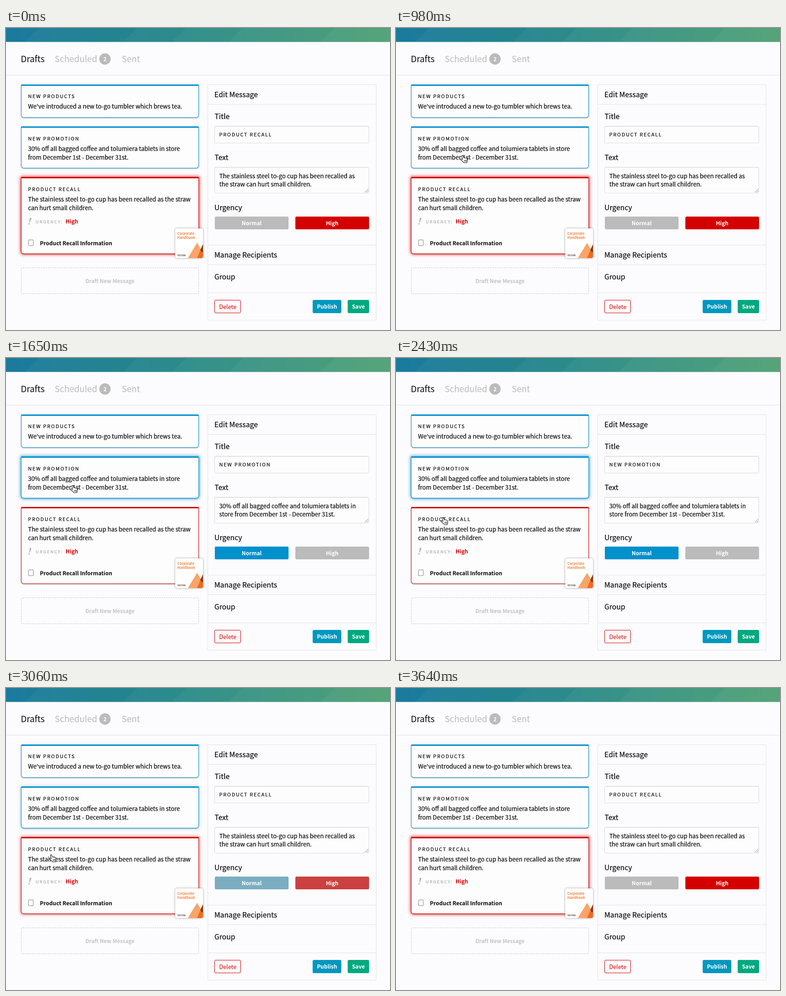
Recreate the animation shown at these times as an HTML page. Size 844x663 px, loop 5.23 s.

```html
<!DOCTYPE html>
<html lang="en">
<head>
<meta charset="utf-8">
<title>Message drafts</title>
<style>
  :root { --blue: #0090cc; --red: #d40000; --grey: #bbb; --line: #e3e3e6; --loop: 5230ms; }
  html, body { margin: 0; width: 100%; height: 100%; overflow: hidden; background: #fcfbfd; }
  .stage { position: relative; width: 844px; height: 663px; overflow: hidden; }
  .stage div { position: absolute; box-sizing: border-box; }
  svg { position: absolute; left: 0; top: 0; }

  .card {
    left: 33px; width: 391px;
    border: 1px solid var(--tone); border-top-width: 3px; border-radius: 2px 2px 6px 6px;
    background: #fdfdfe; box-shadow: 0 1px 3px rgba(0, 0, 0, .28);
  }
  .card.blue { --tone: var(--blue); --halo: rgba(0, 144, 204, .6); }
  .card.red { --tone: var(--red); --halo: rgba(212, 0, 0, .6); }
  .glow { inset: -3px -1px -1px; border-radius: inherit; box-shadow: 0 0 6px 2px var(--halo); }

  .draft { left: 33px; top: 526px; width: 391px; height: 58px; border: 1px dashed #c6c6ca; border-radius: 4px; }
  .thumb { left: 372px; top: 440px; width: 61px; height: 65px; border-radius: 4px; background: #fff; box-shadow: 0 0 4px rgba(0, 0, 0, .38); }

  .panel { left: 443px; top: 124px; width: 371px; height: 518px; border: 1px solid var(--line); border-radius: 2px; }
  .rule { left: 443px; width: 371px; height: 1px; background: var(--line); }
  .field { left: 458px; width: 340px; border: 1px solid #dcdcdf; border-radius: 3px; background: #fdfdfe; box-shadow: inset 0 1px 1px rgba(0, 0, 0, .09); }
  .btn { border-radius: 3px; overflow: hidden; }
  .choice { top: 414px; width: 162px; height: 28px; background: var(--grey); }
  .fill { inset: 0; }
  .act { top: 597px; height: 29px; }

  text { font-family: "Noto Sans CJK JP", "Noto Sans CJK SC", "Noto Sans CJK", "Noto Sans", sans-serif; fill: #0a0a0c; white-space: pre; }
  .tab { font-size: 18.9px; font-weight: 300; }
  .cap { font-size: 10.9px; letter-spacing: 1.75px; }
  .body { font-size: 13.12px; }
  .head { font-size: 15.8px; }
  .cap, .body, .head { stroke: #0a0a0c; stroke-width: .22px; }
  .bold { font-size: 11.95px; font-weight: 700; }
  .mid { text-anchor: middle; }
  .mute { fill: var(--grey); }
  .white { fill: #fff; }
  .warn { fill: var(--red); }

  .on, .off, .after, .before, .hand, .hand g { animation: var(--loop) infinite; }
  .on { animation-name: on; animation-timing-function: ease; }
  .off { animation-name: off; animation-timing-function: ease; }
  .after { animation-name: after; animation-timing-function: step-end; }
  .before { animation-name: before; animation-timing-function: step-end; }
  .hand { animation-name: show; animation-timing-function: step-end; }
  .hand g { animation-name: move; animation-timing-function: linear; }

  @keyframes on {
    0%, 28.3% { opacity: 0; }
    31.5%, 57.25% { opacity: 1; }
    60.6%, 100% { opacity: 0; }
  }
  @keyframes off {
    0%, 28.3% { opacity: 1; }
    31.5%, 57.25% { opacity: 0; }
    60.6%, 100% { opacity: 1; }
  }
  @keyframes after {
    0% { opacity: 0; }
    27.725% { opacity: 1; }
    57.361%, 100% { opacity: 0; }
  }
  @keyframes before {
    0% { opacity: 1; }
    27.725% { opacity: 0; }
    57.361%, 100% { opacity: 1; }
  }
  @keyframes show {
    0% { opacity: 0; }
    8.987% { opacity: 1; }
    69.598%, 100% { opacity: 0; }
  }
  @keyframes move {
    0%, 8.987% { transform: translate(5px, 313px); }
    13.6% { transform: translate(104px, 302px); animation-timing-function: ease-out; }
    18.5% { transform: translate(141px, 279px); }
    39.9% { transform: translate(141px, 279px); animation-timing-function: cubic-bezier(.4, 0, .7, .9); }
    46.463% { transform: translate(98px, 349px); animation-timing-function: ease-out; }
    50.6% { transform: translate(94px, 365px); }
    66.5% { transform: translate(94px, 365px); animation-timing-function: ease-in; }
    68.451%, 100% { transform: translate(37px, 402px); }
  }
</style>
</head>
<body>
<div class="stage">
  <div class="card blue" style="top:124px;height:73px"></div>
  <div class="card blue" style="top:216px;height:92px"><div class="glow on"></div></div>
  <div class="card red" style="top:327px;height:169px"><div class="glow off"></div></div>
  <div class="draft"></div>
  <div class="thumb"></div>

  <div class="panel"></div>
  <div class="rule" style="top:167px"></div>
  <div class="rule" style="top:476px"></div>
  <div class="rule" style="top:519px"></div>
  <div class="rule" style="top:581px"></div>
  <div class="field" style="top:215px;height:38px"></div>
  <div class="field" style="top:305px;height:58px"></div>
  <div class="btn choice" style="left:459px"><div class="fill on" style="background:var(--blue)"></div></div>
  <div class="btn choice" style="left:636px"><div class="fill off" style="background:var(--red)"></div></div>
  <div class="btn act" style="left:458px;width:58px;border:1px solid var(--red)"></div>
  <div class="btn act" style="left:674px;width:63px;background:#0098bf"></div>
  <div class="btn act" style="left:751px;width:47px;background:#00a97f"></div>

  <svg width="844" height="663" viewBox="0 0 844 663">
    <defs>
      <linearGradient id="sky" gradientUnits="userSpaceOnUse" x1="0" x2="844" y1="0" y2="0">
        <stop offset="0" stop-color="#1b7b9e"/>
        <stop offset=".47" stop-color="#19817f"/>
        <stop offset="1" stop-color="#2f905c"/>
      </linearGradient>
    </defs>

    <rect width="844" height="30.6" fill="url(#sky)"/>
    <g fill="#fff" fill-opacity=".04">
      <path d="M73 0H844V30.6H42z"/>
      <path d="M288 0H844V30.6H257z"/>
      <path d="M396 0H844V30.6H365z"/>
      <path d="M520 0H844V30.6H489z"/>
      <path d="M723 0H844V30.6H692z"/>
    </g>
    <path d="M0 103.5H844" stroke="#dfdfe2"/>

    <text class="tab" x="32.4" y="75">Drafts</text>
    <text class="tab mute" x="107" y="75">Scheduled</text>
    <circle cx="217.5" cy="68" r="12.5" fill="#bbb"/>
    <text class="bold white mid" x="217.5" y="72.5">2</text>
    <text class="tab mute" x="254.3" y="75">Sent</text>

    <text class="cap" x="48.5" y="154">NEW PRODUCTS</text>
    <text class="body" x="48.5" y="177">We've introduced a new to-go tumbler which brews tea.</text>

    <text class="cap" x="48.5" y="246.5">NEW PROMOTION</text>
    <text class="body" x="48.5" y="270">30% off all bagged coffee and tolumiera tablets in store</text>
    <text class="body" x="48.5" y="288.5">from December 1st - December 31st.</text>

    <text class="cap" x="48.5" y="357.5">PRODUCT RECALL</text>
    <text class="body" x="48.5" y="381">The stainless steel to-go cup has been recalled as the straw</text>
    <text class="body" x="48.5" y="399.5">can hurt small children.</text>
    <path d="M52 417H56.2L52.6 427H51.2z" fill="#b4b4b4"/>
    <circle cx="50.6" cy="430" r="1.6" fill="#b4b4b4"/>
    <text class="mute" x="65" y="429" font-size="9.5" font-weight="700" letter-spacing="1.55">URGENCY:</text>
    <text class="bold warn" x="131" y="429">High</text>
    <rect x="49.5" y="465.2" width="10.5" height="12.6" rx="1.5" fill="none" stroke="#a9a9a9" stroke-width="1.5"/>
    <text class="bold" x="74.6" y="476.5">Product Recall Information</text>

    <g>
      <path d="M400 505L420 472L433 494V501Q433 505 429 505z" fill="#f58a45"/>
      <path d="M420 472L428 486L420 505H400z" fill="#f9a468"/>
      <path d="M420 505L433 475V501Q433 505 429 505z" fill="#f26a1b"/>
      <path d="M427 487L433 475V492L430 492z" fill="#8a3a14"/>
      <text x="376.5" y="454.3" font-size="7.6" font-weight="700" style="fill:#f3853f">Corporate</text>
      <text x="376.5" y="463.3" font-size="7.6" font-weight="700" style="fill:#f3853f">Handbook</text>
      <text x="377" y="500.8" font-size="4.1" font-weight="700" style="fill:#5a3a2c">VELTORA</text>
    </g>

    <text class="bold mid" x="228.5" y="559.5" style="font-size:11.6px;fill:#c3c3c9">Draft New Message</text>

    <text class="head" x="458" y="152">Edit Message</text>
    <text class="head" x="458.4" y="200">Title</text>
    <text class="head" x="458.4" y="290">Text</text>
    <text class="head" x="458" y="400">Urgency</text>
    <text class="head" x="458" y="504">Manage Recipients</text>
    <text class="head" x="458" y="552">Group</text>

    <g class="before">
      <text class="cap" x="468.8" y="238">PRODUCT RECALL</text>
      <text class="body" x="468.8" y="329.5">The stainless steel to-go cup has been recalled as</text>
      <text class="body" x="468.8" y="348">the straw can hurt small children.</text>
    </g>
    <g class="after">
      <text class="cap" x="468.8" y="238">NEW PROMOTION</text>
      <text class="body" x="468.8" y="329.5">30% off all bagged coffee and tolumiera tablets in</text>
      <text class="body" x="468.8" y="348">store from December 1st - December 31st.</text>
    </g>
    <path d="M788.5 361L796.5 353M793 361L796.5 357.5" stroke="#777" fill="none"/>

    <text class="bold white mid" x="540" y="433">Normal</text>
    <text class="bold white mid" x="717" y="433">High</text>
    <text class="warn mid" x="487.5" y="616.5" font-size="12.8">Delete</text>
    <text class="bold white mid" x="705.5" y="616.2">Publish</text>
    <text class="bold white mid" x="774.5" y="616.2">Save</text>

    <g class="hand">
      <g stroke="#111" stroke-linejoin="round" stroke-linecap="round">
        <path fill="#fff" stroke-width="1.1" d="M3.6 2.6C3.2 1 5.6 .1 6.4 1.8L8.2 6.2C9 5.4 10.3 5.6 10.7 6.5C11.6 5.9 12.7 6.2 13.1 7.1C14.2 6.7 15 7.3 15.3 8.3C15.9 10.2 16 11.6 15.4 13.2L15 16.8H8.2C7.4 14.9 5.6 13.9 4.2 12.6L1.2 10.1C.3 8.9 1.7 7.8 3 8.5L5.4 9.7z"/>
        <path fill="none" stroke-width=".9" d="M9.2 11.2L9.7 14.2M11.3 10.9L11.7 14.1M13.2 10.6L13.4 14"/>
      </g>
    </g>
  </svg>
</div>
</body>
</html>
```
